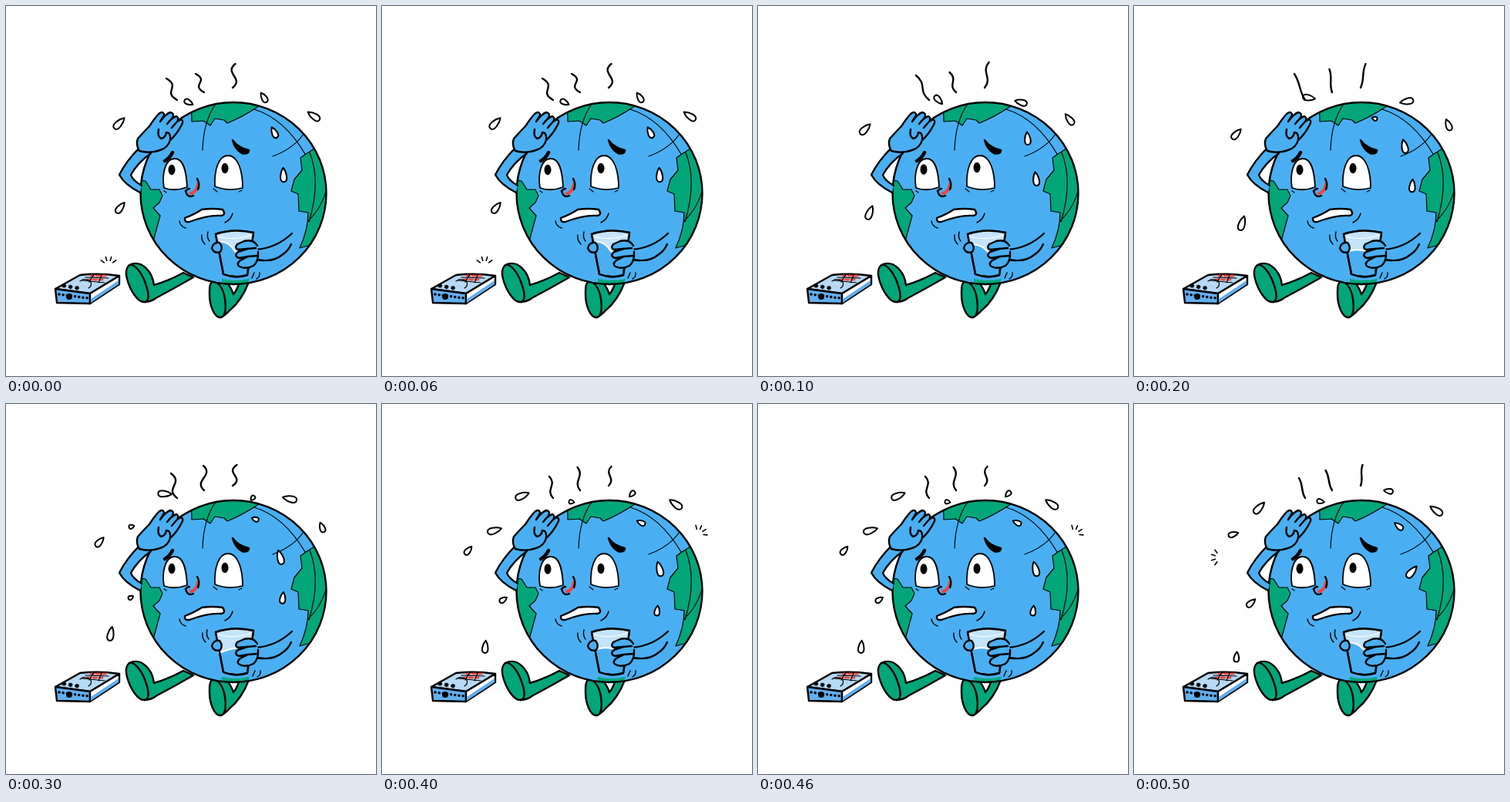
These frames come from a looping animation (480x480 px, 0.6 s). An HTML page:

```html
<!DOCTYPE html>
<html lang="en">
<head>
<meta charset="utf-8">
<title>Feverish globe</title>
<style>
html, body { margin: 0; width: 100%; height: 100%; overflow: hidden; background: #fff; }
svg { display: block; width: 100vw; height: 100vh; }
.l { fill: none; }
.b { fill: #4aaff2; }
.g { fill: #02a678; }
.w { fill: #fff; }
.k { fill: #000; }
.n { stroke: none; }
.t { stroke-width: 1.2; }
</style>
</head>
<body>
<svg viewBox="0 0 480 480" stroke="#000" stroke-width="2.4" stroke-linecap="round" stroke-linejoin="round">
  <clipPath id="disc"><ellipse cx="295" cy="243" rx="120.500" ry="118"/></clipPath>

  <!-- legs -->
  <path class="g" d="M160 336C176 328 190 345 192 362Q212 356 230 346L243 352Q215 368 196 378Q188 384 180 384Z"/>
  <path class="g" d="M159 337C165 332 176 345 181 360C186 374 186 383 180 384C171 385 161 369 157 354C155 346 155 341 159 337Z"/>
  <path class="g" d="M270 356C284 352 291 362 295 374Q301 367 303 356L315 358Q306 382 290 395Q284 402 278 404Z"/>
  <path class="g" d="M267 358C274 355 282 366 284 380C286 394 284 404 278 404C270 404 264 388 264 374C264 366 264 361 267 358Z"/>

  <!-- globe -->
  <g clip-path="url(#disc)">
    <path class="b n" d="M170 120H420V366H170Z"/>
    <g class="g t">
      <path d="M241 150L256 149L265 155L271 146L283 148L287 152Q305 145 328 130L320 115H240Z"/>
      <path d="M405 182L389 192L382 197L384 213L374 225L370 240L379 244L380 266L392 268Q392 290 381 314L430 300V186Z"/>
      <path d="M165 225L181 227L188 238L199 238L203 246L199 255L191 262L200 272L191 305L165 295Z"/>
      <path class="n" d="M280 354Q298 358 316 354L312 366H280Z"/>
    </g>
    <path class="l t" d="M272 127Q256 150 255 187M322 134Q361 146 388 192M386 166Q373 185 346 195M394 190Q409 228 393 280M416 236Q411 260 392 279"/>
  </g>
  <ellipse class="l" cx="295" cy="243" rx="120.500" ry="118"/>

  <!-- face -->
  <path class="w" stroke-width="1.800" d="M205 236C202 219 206 198 219 198C231 198 234 216 235 235Q219 241 205 236Z"/>
  <path class="w" stroke-width="1.800" d="M271 234C270 212 276 194 288 194C301 194 307 214 307 236Q288 241 271 234Z"/>
  <path class="l t" d="M205 240L208 242M232 240L237 237M269 237L274 241M302 241L306 239"/>
  <g id="pupils"></g>
  <path class="l" stroke-width="4.500" d="M206 201Q212 198 216 190"/>
  <path class="k" d="M294 174Q301 184 315 187Q315 193 306 191Q297 186 294 174Z"/>
  <path class="l" stroke="#ef4238" stroke-width="4" d="M249 231Q247 242 240 243"/>
  <path class="l" d="M248 224Q252 231 249 238M238 237Q232 238 234 243Q237 249 243 246"/>
  <path class="w" d="M232 275Q245 270 254 264Q268 262 281 264Q286 271 279 272Q262 271 238 280Q231 281 232 275Z"/>
  <path class="l" stroke-width="1.500" d="M225 279Q226 286 233 288M294 269Q292 277 284 281"/>

  <!-- raised arm -->
  <path class="b n" d="M173 184Q156 201 147 219Q154 232 174 242L176 233Q163 226 162 219Q171 203 188 191Z"/>
  <path class="l" d="M173 184Q156 201 147 219Q154 232 174 242M188 191Q171 203 162 219Q164 226 176 233"/>
  <path class="b" d="M173 188Q168 180 171 172Q180 162 186 156Q193 145 199 139Q205 136 205 142L200 150Q207 140 213 138Q219 139 216 145L209 153Q215 145 221 143Q225 145 222 150L215 158Q222 149 227 147Q231 149 228 154Q222 166 213 174Q210 184 200 187Q186 192 173 188Z"/>
  <path class="l" d="M198 160Q196 169 201 172Q207 171 208 164Q214 164 213 174"/>

  <!-- glass and holding arm -->
  <path class="b" d="M272 296Q295 288 321 294L313 349Q298 354 282 348Z"/>
  <g id="water"></g>
  <path class="l" d="M272 296Q295 288 321 294L313 349Q298 354 282 348Z"/>
  <path class="l t" stroke="#fff" d="M275 299Q297 305 318 297"/>
  <path class="b n" d="M322 316Q347 314 371 295V310Q352 329 326 330Z"/>
  <path class="l" d="M324 316Q351 314 371 295M325 329Q346 333 358 323Q366 318 370 309"/>
  <path class="b" d="M267 314Q269 306 277 307Q282 313 278 319Q270 322 267 314Z"/>
  <path class="b" d="M326 311Q321 302 309 305L300 309Q296 314 301 316L313 315L301 319Q295 324 302 327L314 325L304 330Q298 335 303 338Q311 342 321 337Q328 331 327 319"/>
  <path class="l" d="M313 315L324 314M314 325L326 324"/>

  <!-- instrument -->
  <path fill="#b5d9f6" d="M64 367L96 349Q120 346 147 350L109 373Z"/>
  <path fill="#62aeee" d="M64 367L109 373V386L66 385Z"/>
  <path class="w" d="M109 373L147 350V361L109 386Z"/>
  <path fill="#62aeee" class="n" d="M110 380L146 356V361L110 385Z"/>
  <path class="l" stroke="#e74a43" stroke-width="3" stroke-dasharray="4 3.500" d="M110 350H130M106 355H128"/>
  <path class="l t" d="M103 352L133 353M99 356L128 359M96 357Q103 352 110 358Q112 363 107 366M114 348L108 358M124 349L120 359"/>
  <path class="l" stroke-width="5" stroke-dasharray="0.500 8" d="M75 363L100 367"/>
  <path class="l" stroke-width="3.500" stroke-dasharray="0 5.200" d="M69 374L106 379"/>
  <circle class="k n" cx="82" cy="377" r="4"/>

  <g id="moving"></g>
</svg>
<script>
const STEP = 100, COUNT = 6;
const get = id => document.getElementById(id);
const wave = (n, peak) => Math.cos((n - peak) * 2 * Math.PI / COUNT);
const line = (d, more = "") => `<path class="l" d="${d}" ${more}/>`;

// Drops pass one key point every two steps; burst is the direction of the splash at the end.
const drops = [
  { start: 4, burst: 180, keys: [[246, 127], [237, 125], [227, 119], [182, 119], [147, 152], [133, 166], [112, 190]] },
  { start: 3, burst: -90, keys: [[162, 251], [152, 258], [145, 268], [136, 298], [133, 328]] },
  { start: 3, burst: -50, keys: [[320, 122], [330, 113], [341, 125], [368, 123], [392, 138], [404, 147], [410, 160]] },
  { start: 2, keys: [[312, 146], [336, 154], [348, 164], [351, 182], [360, 214], [360, 219], [361, 233], [357, 268]] },
  { start: 3, keys: [[163, 159], [129, 169]] }
];

// Smooth curve through the key points
function along(keys, age) {
  const last = keys.length - 1;
  const u = Math.min(Math.max(age / 2, 0), last);
  const i = Math.min(Math.floor(u), last - 1), f = u - i;
  const key = j => keys[Math.min(Math.max(j, 0), last)];
  return [0, 1].map(k => {
    const [a, b, c, d] = [-1, 0, 1, 2].map(j => key(i + j)[k]);
    return b + f / 2 * (c - a + f * (2 * a - 5 * b + 4 * c - d + f * (3 * (b - c) + d - a)));
  });
}

// The tip trails behind; drops swell and then shrink.
function drop(keys, age) {
  const [x, y] = along(keys, age);
  const [ax, ay] = along(keys, age - 0.4), [bx, by] = along(keys, age + 0.4);
  const tilt = Math.atan2(ax - bx, by - ay) * 180 / Math.PI;
  const len = 7 + 12 * Math.sin(2.6 * age / (2 * keys.length - 2));
  const h = len / 2, c = 3 + len * 0.22;
  return `<path class="w" stroke-width="2" transform="translate(${x} ${y}) rotate(${tilt})"
    d="M0 ${-h}C${c / 2} ${-h / 2} ${c} ${h} 0 ${h}S${-c / 2} ${-h / 2} 0 ${-h}Z"/>`;
}

function splash([x, y], facing) {
  let d = "";
  for (let i = 0; i < 4; i++) {
    const a = (facing - 54 + 36 * i) * Math.PI / 180;
    d += `M${x + 7 * Math.cos(a)} ${y + 9 + 7 * Math.sin(a)}l${5 * Math.cos(a)} ${5 * Math.sin(a)}`;
  }
  return line(d, 'stroke-width="1.600"');
}

function drawDrops(n) {
  let out = "";
  for (const { start, burst, keys } of drops) {
    const end = 2 * (keys.length - 1);
    for (let age = (n - start + COUNT) % COUNT; age <= end + 1; age += COUNT) {
      if (age <= end) out += drop(keys, age);
      else if (burst) out += splash(keys.at(-1), burst);
    }
  }
  return out;
}

// Wavy line from a swaying top to a fixed foot; it straightens over three steps.
function steam(n, x, y, sway, xPeak, yPeak, footX, footY, side) {
  const top = x + sway * wave(n, xPeak), high = y - 4 * wave(n, yPeak);
  const bend = side * (14 - 5.5 * (n % 3));
  const mix = (a, b, f) => a + (b - a) * f;
  return line(`M${top} ${high}C${mix(top, footX, 0.4) + bend} ${mix(high, footY, 0.4)}
    ${mix(top, footX, 0.6) - bend} ${mix(high, footY, 0.6)} ${footX} ${footY}`);
}

function drawPupils(n) {
  const pupil = (x, y) => `<ellipse class="k n" cx="${x}" cy="${y}" rx="4.500" ry="6.800"/>`;
  return pupil(215, 213 + wave(n, 4)) + pupil(284, 211.5 + 2 * wave(n, 4));
}

function drawWater(n) {
  const left = 315 - 8 * wave(n, 0), right = 312 + 6 * wave(n, 2.4);
  const top = `L276 ${left}Q286 ${left - 4} 296 317T318 ${right}`;
  return `<path class="n" fill="#c3e4fa" d="M321 294Q295 288 272 296${top}Z"/>` +
    line("M" + top.slice(1), 'stroke="#fff" stroke-width="2"');
}

function drawShake(n) {
  const s = n % 2;
  return line(`M${254 + s} 297q-1 7 4 12M${262 - s} 293q-2 7 2 12M${319 + s} 353l3-7M${325 + s} 354q5-3 4-8`,
    'stroke-width="1.400"');
}

function draw(n) {
  get("pupils").innerHTML = drawPupils(n);
  get("water").innerHTML = drawWater(n);
  get("moving").innerHTML = drawDrops(n) + drawShake(n) +
    steam(n, 211, 92, 6, 4, 2, 222, 122, 1) +
    steam(n, 251, 84, 5, 3, 3, 257, 112, 1) +
    steam(n, 298.5, 77, 2, 2, 1, 294, 106, -1);
}

let shown = -1;
function tick(now) {
  const n = Math.floor(now / STEP) % COUNT;
  if (n !== shown) draw(shown = n);
  requestAnimationFrame(tick);
}
draw(0);
requestAnimationFrame(tick);
</script>
</body>
</html>
```
